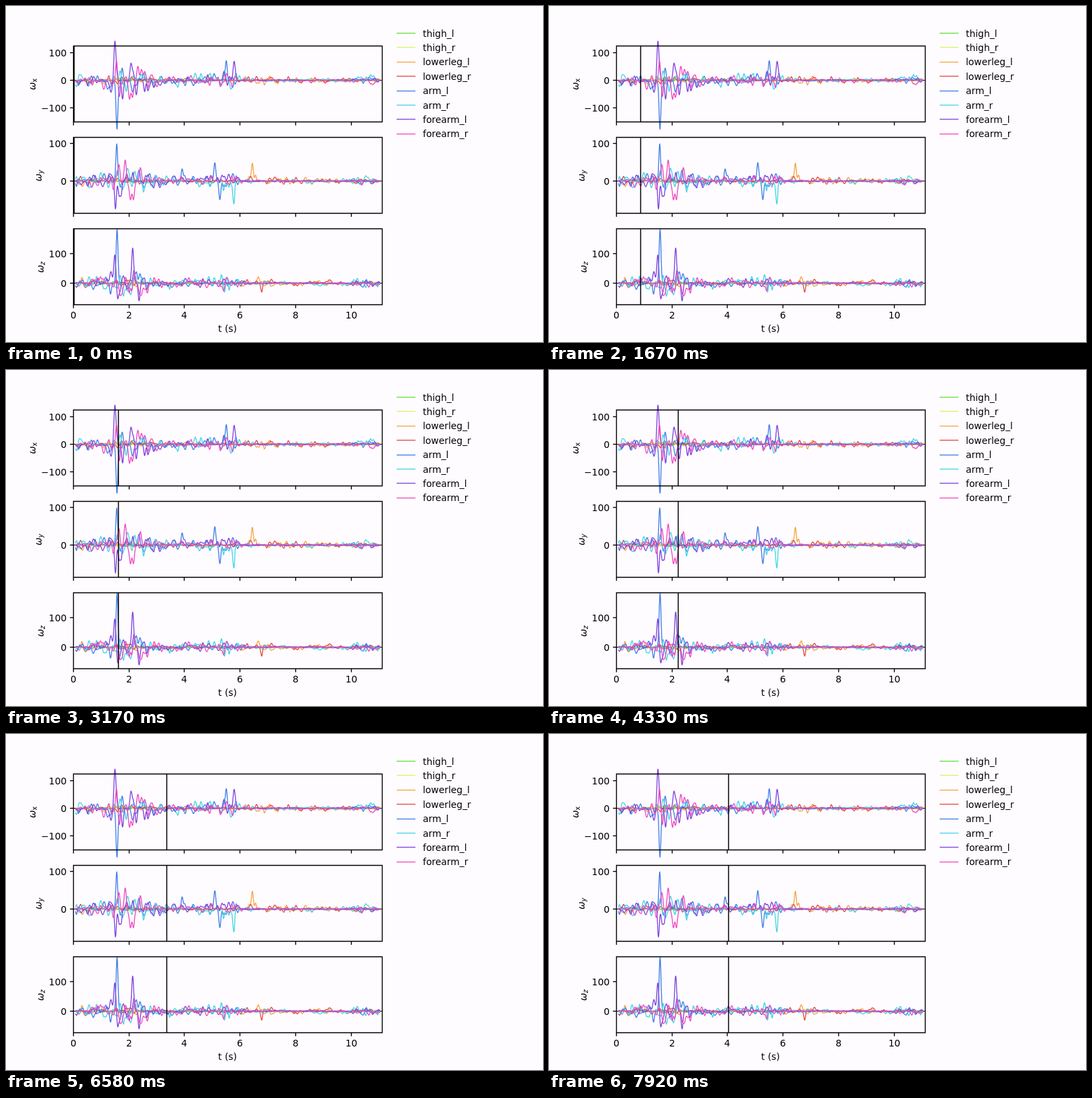
An HTML page for the animation above (8 s loop, 800x500 px).

```html
<!DOCTYPE html>
<html lang="en">
<head>
<meta charset="utf-8">
<title>Angular velocity</title>
<style>
  html, body { margin: 0; width: 100%; height: 100%; overflow: hidden; background: #fffcff; }
  svg { display: block; width: 800px; height: 500px; }
  text { font: 13.89px "DejaVu Sans", sans-serif; fill: #000; }
  .italic { font-style: italic; }
  .sub { font-size: 9.72px; }
  .axis { fill: none; stroke: #000; stroke-width: 1.4; }
  .zero { stroke: #000; stroke-width: 1.1; }
  .signal { fill: none; stroke-width: 1.35; stroke-linejoin: round; }
  #cursor { stroke: #000; stroke-width: 1.5; }
</style>
</head>
<body>
<svg id="stage" viewBox="0 0 800 500"></svg>
<script>
const LEFT = 100.5, RIGHT = 560.5, PANEL_HEIGHT = 113, PANEL_PITCH = 136;

const colors = {
  thigh_l: '#62e238', thigh_r: '#dff066', lowerleg_l: '#f3a545', lowerleg_r: '#e44a42',
  arm_l: '#427fe6', arm_r: '#45d6e6', forearm_l: '#7f45dc', forearm_r: '#ee4cc0'
};

// Spikes name the strongest swings: limb, x position, height in pixels.
const panels = [
  { axis: 'x', zero: 110.5, unit: 0.408, ticks: [100, 0, -100], labelX: 44, spikes: [
    ['arm_l', 165.3, -58], ['forearm_l', 162, 45], ['forearm_r', 164.7, 32],
    ['arm_l', 328.3, 30], ['forearm_l', 339.7, 25]] },
  { axis: 'y', zero: 260.5, unit: 0.565, ticks: [100, 0], labelX: 53, spikes: [
    ['arm_l', 165, 59], ['forearm_l', 163, -43], ['arm_l', 262.5, 25], ['arm_l', 311, 25],
    ['arm_l', 318.6, -27], ['arm_r', 339.7, -26], ['lowerleg_l', 367, 25]] },
  { axis: 'z', zero: 412.5, unit: 0.438, ticks: [100, 0], labelX: 56, spikes: [
    ['arm_l', 165.5, 75], ['forearm_l', 162, 37], ['forearm_l', 166.2, -27],
    ['forearm_l', 188.5, 33], ['forearm_l', 198.3, -24], ['lowerleg_r', 381, -14]] }
];

const stage = document.getElementById('stage');
function add(tag, attributes, content = '') {
  const node = document.createElementNS('http://www.w3.org/2000/svg', tag);
  for (const [key, value] of Object.entries(attributes)) node.setAttribute(key, value);
  node.innerHTML = content;
  return stage.appendChild(node);
}
const path = (d, className, stroke = '') => add('path', { d, class: className, style: stroke && `stroke:${stroke}` });
const label = (x, y, content, anchor = 'start') => add('text', { x, y, 'text-anchor': anchor }, content);
const snap = value => Math.floor(value) + 0.5;

let seed = 11;
function random() {
  seed = (seed * 16807) % 2147483647;
  return seed / 2147483647;
}
const bell = (x, center, width) => Math.exp(-(((x - center) / width) ** 2) / 2);

// Typical swing of a limb: a throw near x = 178, then calm after x = 350.
function restlessness(name, x) {
  if (name.startsWith('thigh')) return 1 + bell(x, 170, 25);
  if (name.startsWith('lowerleg')) {
    return 2 + 4 * bell(x, 112, 6) + 3 * bell(x, 165, 30) + 4 * bell(x, 375, 15) + 2 * bell(x, 430, 40);
  }
  const calm = name === 'arm_r' ? 2.5 : 0.9;
  const early = 5 / (1 + Math.exp((x - 345) / 5));
  const burst = name.startsWith('forearm') ? 17 : 10;
  return calm + early + burst * bell(x, 178, 22) + 4 * bell(x, 330, 12) + 4 * bell(x, 535, 14);
}

function signalPath(panel, name) {
  const bumps = panel.spikes
    .filter(([limb]) => limb === name)
    .map(([, center, size]) => ({ center, size, width: 1.35 }));
  for (let center = 105; center < 556; center += 2.5 + 3 * random()) {
    const swing = random() * 2 - 1;
    bumps.push({ center, size: swing * Math.abs(swing) * 1.4 * restlessness(name, center), width: 1.1 + 0.7 * random() });
  }
  let d = '';
  for (let x = 103.5; x <= 557; x += 0.5) {
    const height = bumps.reduce((sum, { center, size, width }) => sum + size * bell(x, center, width), 0);
    d += `${d ? 'L' : 'M'}${x} ${(panel.zero - height).toFixed(2)}`;
  }
  return d;
}

panels.forEach((panel, row) => {
  const { axis, zero, unit, ticks, labelX } = panel;
  const top = 59.5 + row * PANEL_PITCH, bottom = top + PANEL_HEIGHT;
  path(`M${LEFT} ${zero}H${RIGHT}`, 'zero');
  for (const name in colors) path(signalPath(panel, name), 'signal', colors[name]);
  path(`M${LEFT} ${top}H${RIGHT}V${bottom}H${LEFT}Z`, 'axis');
  for (const value of ticks) {
    const y = snap(zero - value * unit);
    path(`M${LEFT} ${y}h-5.2`, 'axis');
    label(90.3, y + 5, String(value).replace('-', '−'), 'end');
  }
  for (let t = 0; t <= 10; t += 2) {
    const x = snap(100.2 + t * 41.4);
    path(`M${x} ${bottom}v5.2`, 'axis');
    if (row === panels.length - 1) label(x, 465, t, 'middle');
  }
  add('text', { transform: `translate(${labelX} ${top + 65.5}) rotate(-90)` },
    `<tspan class="italic">ω</tspan><tspan class="sub ${axis === 'x' ? '' : 'italic'}" dy="2">${axis}</tspan>`);
});
label(330, 485, 't (s)', 'middle');

Object.entries(colors).forEach(([name, color], index) => {
  const y = 40.5 + index * 21.4;
  path(`M582 ${snap(y)}h28`, 'signal', color);
  label(621, y + 5, name);
});

const cursor = path(panels.map((_, row) => `M0 ${59.5 + row * PANEL_PITCH}v${PANEL_HEIGHT}`).join(''), '');
cursor.id = 'cursor';

// Twelve steps a second, timed in whole hundredths.
const start = performance.now();
function draw() {
  const hundredths = Math.floor(((performance.now() - start) % 8000) / 10);
  const step = Math.floor((hundredths + 0.5) * 3 / 25);
  cursor.setAttribute('transform', `translate(${snap(101 + step * 1.757)} 0)`);
  requestAnimationFrame(draw);
}
draw();
</script>
</body>
</html>
```
